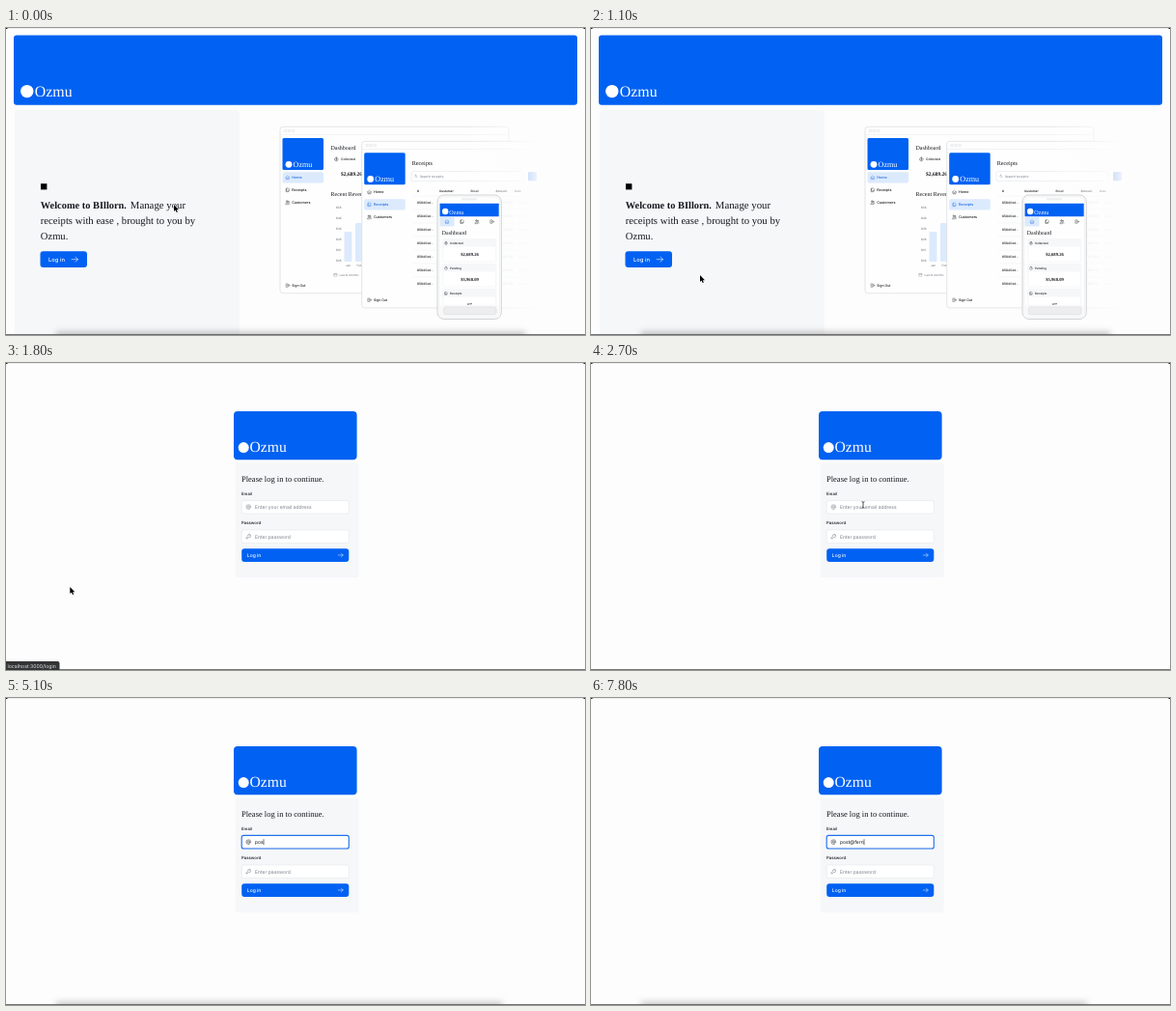
These frames come from a looping animation (600x318 px, 8 s). An HTML page with a canvas:

```html
<!DOCTYPE html>
<html lang="en">
<head>
<meta charset="utf-8">
<title>Login walkthrough</title>
<style>
html, body { margin: 0; width: 600px; height: 318px; overflow: hidden; background: #fdfdfd; }
canvas { display: block; width: 600px; height: 318px; }
</style>
</head>
<body>
<canvas id="stage"></canvas>
<script>
const W = 600, H = 318, LOOP = 8000, STEP = 100;
const BRAND = 'Ozmu', APP = 'BIllorn', EMAIL = 'post@fern';
const KEYS = [4600, 4900, 5100, 5900, 6500, 7300, 7500, 7600, 7800];
const FOCUS = 4000;
const BLUE = '#0061f2', HOVER = '#2578fa', PALE = '#dceafd', INK = '#16181d', PANEL = '#f6f7f9';
const SERIF = '"Liberation Serif", serif', SANS = 'Inter, sans-serif';

const ICONS = {
  home: 'M2 12L12 3L22 12M5 10V21H10V15H14V21H19V10',
  docs: 'M8 3H16L20 7V17H8ZM8 7H4V21H16V17',
  users: 'M9 4A4 4 0 1 1 8.9 4ZM2 20C2 12 16 12 16 20ZM17 6A3 3 0 1 1 16.9 6M18 14C21 14 22 17 22 19',
  out: 'M14 8V4H4V20H14V16M9 12H22M18 8L22 12L18 16',
  arrow: 'M3 12H21M14 5L21 12L14 19',
  coin: 'M12 3A9 9 0 1 1 11.9 3ZM12 7V17M9.5 14.5C12 17 15 14 12 12S11 8 14.5 9.5',
  clock: 'M12 3A9 9 0 1 1 11.9 3ZM12 7V12H16',
  calendar: 'M3 5H21V21H3ZM3 10H21M8 2V6M16 2V6',
  lens: 'M10 4A6 6 0 1 1 9.9 4ZM15 15L21 21',
  at: 'M16 12A4 4 0 1 1 8 12A4 4 0 1 1 16 12V14C16 17 21 16.5 21 12A9 9 0 1 0 16.5 19.8',
  key: 'M15 3A6 6 0 1 1 12.9 14.6L10 17H8V20H3V16L9.3 10.5A6 6 0 0 1 15 3M16 7.5L17.5 9'
};
for (const k in ICONS) ICONS[k] = new Path2D(ICONS[k]);

const ARROW = new Path2D('M0 0V7L1.6 5.6L2.7 8.1L3.9 7.6L2.8 5.2H5Z');
const HAND = new Path2D('M-1 -3.6Q-.3 -4.4 .3 -3.6V-1.2L2.6 -.6Q3.4 -.3 3.2 .6L2.6 3.6H-1.2L-3 .8Q-2.8 -.2 -1 1Z');
const IBEAM = new Path2D('M-1.5 -3.3Q0 -3.3 0 -2.5Q0 -3.3 1.5 -3.3M0 -2.6V2.6M-1.5 3.3Q0 3.3 0 2.5Q0 3.3 1.5 3.3');

const canvas = document.getElementById('stage');
const dpr = window.devicePixelRatio || 1;
canvas.width = W * dpr;
canvas.height = H * dpr;
const c = canvas.getContext('2d');
c.textRendering = 'geometricPrecision';

function box(x, y, x2, y2, r, fill, line, width = 0.6) {
  c.beginPath();
  c.roundRect(x, y, x2 - x, y2 - y, r);
  if (fill) { c.fillStyle = fill; c.fill(); }
  if (line) { c.strokeStyle = line; c.lineWidth = width; c.stroke(); }
}

function dot(x, y, r, fill, line) {
  c.beginPath();
  c.arc(x, y, r, 0, 7);
  if (fill) { c.fillStyle = fill; c.fill(); }
  if (line) { c.strokeStyle = line; c.lineWidth = 0.5; c.stroke(); }
}

function text(s, x, y, size, color = INK, family = SANS, weight = 400) {
  c.font = `${weight} ${size}px ${family}`;
  c.fillStyle = color;
  c.fillText(s, x, y);
}

const serif = (s, x, y, size, color = INK, weight = 400) => text(s, x, y, size, color, SERIF, weight);

function rule(x, y, x2, color = '#ebedf0') {
  c.fillStyle = color;
  c.fillRect(x, y, x2 - x, 0.5);
}

function icon(name, x, y, size, color = INK, width = 1.7) {
  const k = size / 24;
  c.save();
  c.translate(x - size / 2, y - size / 2);
  c.scale(k, k);
  c.strokeStyle = color;
  c.lineWidth = width;
  c.lineJoin = c.lineCap = 'round';
  c.stroke(ICONS[name]);
  c.restore();
}

function logo(x, y, r, textX, baseline, size) {
  dot(x, y, r, '#fff');
  serif(BRAND, textX, baseline, size, '#fff');
}

// Browser mock-up: frame, brand card and side menu
function appWindow(x, y, right, active) {
  box(x, y, right, y + 172.5, 3, '#fefefe', '#d3d5d9');
  rule(x, y + 8, right, '#e6e7ea');
  for (let i = 0; i < 3; i++) dot(x + 5.5 + i * 4, y + 4.2, 1.3, '#fff', '#cfd1d5');
  box(x + 2.5, y + 11.8, x + 45, y + 44.8, 1.5, BLUE);
  logo(x + 9, y + 39, 3.4, x + 13.6, y + 41.9, 8.1);
  ['Home', 'Receipts', 'Customers'].forEach((label, i) => {
    const row = y + 52.6 + i * 12.9;
    const color = i === active ? '#1767e0' : INK;
    if (i === active) box(x + 2.5, row - 5.6, x + 45, row + 5.6, 1.5, PALE);
    icon(['home', 'docs', 'users'][i], x + 7.8, row, 5, color);
    text(label, x + 12.2, row + 1.4, 3.7, color, SANS, 500);
  });
  icon('out', x + 7.8, y + 164.3, 5);
  text('Sign Out', x + 12.2, y + 165.7, 3.5, INK, SANS, 500);
}

function dashboard() {
  appWindow(284, 102.3, 521, 0);
  serif('Dashboard', 336.5, 125.6, 6);
  icon('coin', 342.3, 136, 5);
  text('Collected', 347, 137.4, 3.3, INK, SANS, 500);
  serif('$2,689.26', 347, 153, 5.5, INK, 700);
  serif('Recent Revenue', 336.5, 174.3, 6);
  for (let i = 0; i < 6; i++) text(`$${5 - i}K`, 342, 187.2 + i * 11, 3, '#70757f');
  box(350.5, 211, 358.5, 242, 1, PALE);
  box(362, 202, 370, 242, 1, PALE);
  text('Jan', 352, 247.3, 3, '#70757f');
  text('Feb', 363.5, 247.3, 3, '#70757f');
  icon('calendar', 341.5, 255.7, 4, '#70757f');
  text('Last 6 months', 345.5, 257, 3, '#70757f');
}

function receipts() {
  appWindow(368.7, 117.4, 556, 1);
  serif('Receipts', 420.7, 141.7, 6.2);
  box(420, 148.6, 536, 158.6, 1.5, '#fff', '#e3e5e8');
  icon('lens', 425, 153.6, 4, '#6b7280');
  text('Search receipts', 429, 154.9, 3.3, '#6b7280');
  box(541, 149, 550, 158.2, 1.5, BLUE);
  const heads = ['#', 426, 'Customer', 449, 'Email', 481.5, 'Amount', 507.5, 'Date', 527];
  for (let i = 0; i < heads.length; i += 2) text(heads[i], heads[i + 1], 169.7, 3.1, INK, SANS, 600);
  for (let i = 0; i < 7; i++) {
    const y = 182 + i * 14;
    rule(422, y - 8.3, 552);
    text('8584Oed...', 426, y, 3.2, INK, SANS, 500);
    text('$157.95', 515, y, 3.1, '#d5d7db');
    text('Dec 6', 532, y, 3.1, '#d5d7db');
  }
}

function phone() {
  box(447, 173, 513.3, 301.5, 7, '#fefefe', '#c5c7cb', 0.8);
  box(448.8, 174.8, 511.5, 299.7, 5.5, null, '#e6e7ea');
  box(472, 176.2, 488, 178.6, 1.2, '#eceef0');
  box(449.6, 181.8, 510.7, 195.2, 0.5, BLUE);
  logo(455.2, 190, 3.2, 459.3, 192.8, 6.2);
  box(449.6, 196, 464.6, 205.4, 1, PALE);
  ['home', 'docs', 'users', 'out'].forEach((n, i) =>
    icon(n, 457 + i * 15.5, 200.6, 5, i ? INK : '#1767e0'));
  serif('Dashboard', 451.8, 214.4, 5.9);
  const cards = [['coin', 'Collected', '$2,689.26'], ['clock', 'Pending', '$5,968.09'], ['docs', 'Receipts', '67']];
  cards.forEach(([n, label, value], i) => {
    const y = 218 + i * 26;
    const end = i < 2 ? y + 24.5 : 288;
    box(452, y, 508.5, end, 2, PANEL);
    box(453.3, y + 8.6, 507.2, end - 1, 1.5, '#fff');
    icon(n, 456, y + 4.9, 4);
    text(label, 460, y + 6, 3, INK, SANS, 500);
    c.textAlign = 'center';
    serif(value, 480.5, y + 17.8, 4.7, INK, 700);
    c.textAlign = 'left';
  });
  box(449.6, 286.8, 510.7, 298.5, 3, '#f8f8f9');
  box(453.5, 289, 508, 296.8, 2, '#ededef', '#d5d6d9', 0.5);
}

function home(t) {
  box(8, 7.5, 592, 79.8, 3, BLUE);
  logo(21.8, 65.6, 6.7, 29.8, 71, 15.9);

  box(9, 85, 241.7, 325, 3, PANEL);
  c.fillStyle = '#000';
  c.fillRect(36, 161.2, 6.4, 6.2);
  serif(`Welcome to ${APP}.`, 35.8, 187.3, 10.4, INK, 700);
  serif('Manage your', 128.8, 187.3, 10.8);
  serif('receipts with ease , brought to you by', 35.8, 203, 10.7);
  serif(BRAND + '.', 35.8, 218.8, 10.58);

  box(35.5, 231.3, 84, 248, 3, t >= 1500 ? HOVER : BLUE);
  text('Log in', 44, 241.7, 5.8, '#fff', SANS, 500);
  icon('arrow', 71.3, 239.7, 8.5, '#fff');

  dashboard();
  receipts();
  const fade = c.createLinearGradient(470, 0, 556, 0);
  fade.addColorStop(0, '#fdfdfd00');
  fade.addColorStop(1, '#fdfdfd');
  c.fillStyle = fade;
  c.fillRect(470, 95, 110, 205);
  phone();
}

function caretOn(t) {
  const last = KEYS.filter(k => k <= t).pop() || FOCUS;
  return Math.floor((t - last) / 500) % 2 === 0;
}

function field(y, name, hint, value, focused) {
  box(244.2, y, 355.3, y + 13.6, 2, '#fff', '#e3e6ea');
  if (focused) box(244.2, y, 355.3, y + 13.6, 2, null, '#1f6fee', 1.1);
  icon(name, 251.3, y + 6.8, 6.4, focused ? INK : '#6b7280');
  text(value || hint, 258, y + 8.6, 5, value ? INK : '#7b818c');
}

function login(t) {
  box(237.6, 103.5, 365.6, 222.3, 3, PANEL);
  box(236, 50, 363.6, 100.2, 4, BLUE);
  logo(246.2, 87.6, 5.5, 252.6, 92.4, 15.6);
  serif('Please log in to continue.', 244, 123, 8.5);

  const typed = EMAIL.slice(0, KEYS.filter(k => k <= t).length);
  const focused = t >= FOCUS;
  text('Email', 244, 136.8, 4.3, INK, SANS, 500);
  field(142.4, 'at', 'Enter your email address', typed, focused);
  if (focused && caretOn(t)) {
    c.font = `400 5px ${SANS}`;
    c.fillStyle = INK;
    c.fillRect(258 + c.measureText(typed).width, 146.2, 0.6, 6);
  }
  text('Password', 244, 167.4, 4.3, INK, SANS, 500);
  field(173, 'key', 'Enter password', '', false);

  box(244.2, 192.2, 355.3, 206, 3, BLUE);
  text('Log in', 249.8, 200.7, 5, '#fff', SANS, 500);
  icon('arrow', 346.8, 199, 6.6, '#fff');
}

// Each leg: start, end, from x, from y, to x, to y
const LEGS = [
  [0, 900, 174, 183, 113, 256],
  [1100, 1600, 113, 256, 66.3, 232],
  [1900, 2700, 66.3, 232, 282, 147],
  [2700, 3200, 282, 147, 264.3, 148.3]
];

function pointer(t) {
  const [a, b, x, y, x2, y2] = LEGS.filter(l => l[0] <= t).pop();
  const p = Math.min(1, (t - a) / (b - a));
  const e = p * p * (3 - 2 * p);
  return [x + (x2 - x) * e, y + (y2 - y) * e];
}

function cursor(t) {
  if (t >= KEYS[0]) return;
  const [x, y] = pointer(t);
  c.save();
  c.translate(x, y);
  c.lineJoin = 'round';
  if (t >= 1500 && t < 1800) {
    c.translate(0.9, 3.6);
    c.fillStyle = '#fff';
    c.fill(HAND);
    c.strokeStyle = '#111';
    c.lineWidth = 0.8;
    c.stroke(HAND);
  } else if (t >= 1800 && x > 244 && x < 355 && y > 142 && y < 156) {
    c.strokeStyle = '#111';
    c.lineWidth = 0.7;
    c.stroke(IBEAM);
  } else {
    c.strokeStyle = '#fff';
    c.lineWidth = 1.1;
    c.stroke(ARROW);
    c.fillStyle = '#000';
    c.fill(ARROW);
  }
  c.restore();
}

function statusBar(t) {
  if (t < 1600 || t >= 2300) return;
  c.save();
  c.globalAlpha = t < 1700 ? 0.35 : t < 1800 ? 0.75 : 1;
  box(-3, 309, 55.5, 321, 2, '#333436');
  text('localhost:3000/login', 1.4, 315.6, 5.2, '#e4e5e7');
  c.restore();
}

function screenEdge(t) {
  if (t < 1200 || t >= 3500) {
    c.save();
    c.filter = `blur(${3 * dpr}px)`;
    c.fillStyle = `rgba(0,0,0,${t < 1200 ? 0.22 : 0.2})`;
    c.fillRect(52, 314.5, t < 1200 ? 486 : 462, 8);
    c.restore();
  }
  c.fillStyle = '#e4e4e4';
  c.fillRect(0, 0, W, 0.6);
  c.fillStyle = '#555';
  c.fillRect(0, 317.2, W, 0.8);
  c.fillStyle = '#222';
  c.fillRect(0, 0, 1.5, 1);
  c.fillRect(W - 1.5, 0, 1.5, 1);
}

function draw(t) {
  c.setTransform(dpr, 0, 0, dpr, 0, 0);
  c.fillStyle = '#fdfdfd';
  c.fillRect(0, 0, W, H);
  (t < 1800 ? home : login)(t);
  screenEdge(t);
  statusBar(t);
  cursor(t);
}

const begin = performance.now();
function tick() {
  const t = (performance.now() - begin) % LOOP;
  draw(Math.floor(t / STEP) * STEP);
  requestAnimationFrame(tick);
}
tick();
</script>
</body>
</html>
```
